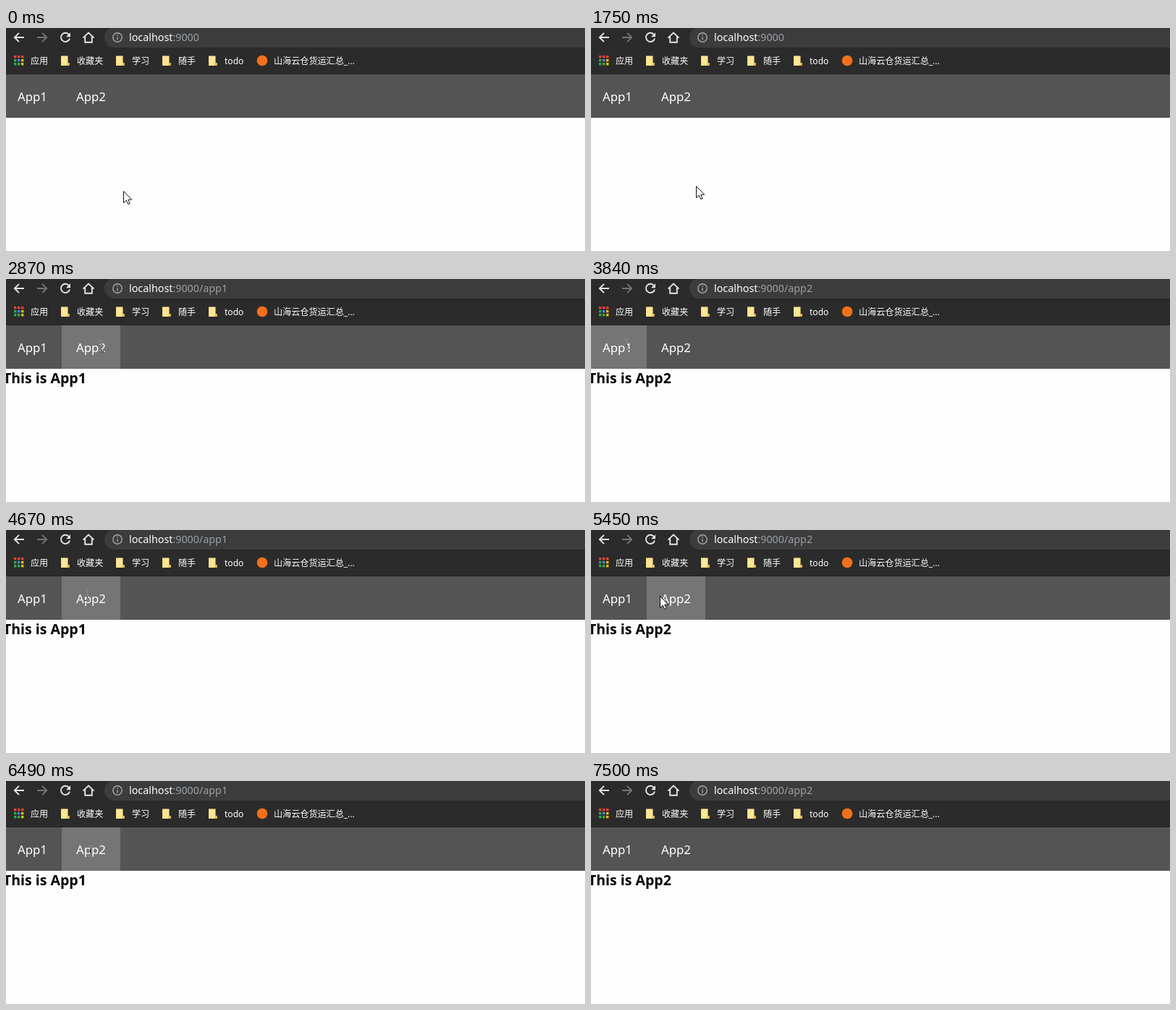
Write an HTML page that moves like this. It is 800 by 308 pixels and loops after 8.06 s.

```html
<!DOCTYPE html>
<html lang="zh">
<head>
<meta charset="utf-8">
<title>Micro frontend routing</title>
<style>
  html, body { margin: 0; width: 100%; height: 100%; overflow: hidden; background: #fefefe; }
  svg { display: block; width: 800px; height: 308px; }
  text { font-family: "Noto Sans", "Noto Sans CJK SC", "Noto Sans CJK", sans-serif; fill: #fff; white-space: pre; }
  .url { font-size: 14.3px; }
  .dim { fill: #9aa0a6; }
  .marks { font-size: 12.1px; }
  .nav { font-size: 16.8px; }
  #page { font-size: 19.5px; font-weight: 700; fill: #000; }
  .icon { fill: none; stroke: #e4e6e9; stroke-width: 1.9; }
  #beam { fill: none; stroke: #fff; mix-blend-mode: difference; }
</style>
</head>
<body>
<svg viewBox="0 0 800 308">
  <defs>
    <g id="folder">
      <path d="M0 .5h9.5v9.5h2v4H0z" fill="#ffe594"/>
      <path d="M9.5 10h2v4H8.5v-2.5z" fill="#e9bd50"/>
    </g>
  </defs>

  <rect width="800" height="308" fill="#fefefe"/>
  <rect width="800" height="64" fill="#2b2b2b"/>
  <rect x="136" y="-1" width="700" height="28" rx="14" fill="#3c3c3c"/>
  <rect y="63" width="800" height="1" fill="#222"/>

  <g class="icon">
    <path d="M25 13H12.5M18 6.8L11.8 13L18 19.2"/>
    <path d="M43 13h12.5M50 6.8L56.2 13L50 19.2" stroke="#747474"/>
    <path d="M87 9.2A6.1 6.1 0 1 0 88 14.4"/>
    <path d="M89 6.2v6h-6z" fill="#e4e6e9" stroke="none"/>
    <path d="M106.5 13.6L114 6.6L121.5 13.6M109.2 12v7.8h9.6V12"/>
    <g stroke="#a4a8ad" stroke-width="1.4">
      <circle cx="154" cy="13" r="6.2"/>
      <path d="M154 12.2v4.3M154 9.2v1.6"/>
    </g>
  </g>
  <text class="url" x="170" y="18">localhost<tspan class="dim">:9000<tspan id="route"></tspan></tspan></text>

  <g id="apps"></g>
  <use href="#folder" x="76" y="38"/>
  <use href="#folder" x="152" y="38"/>
  <use href="#folder" x="216" y="38"/>
  <use href="#folder" x="280" y="38"/>
  <circle cx="354" cy="45" r="7.3" fill="#f2701c"/>
  <g class="marks">
    <text x="34" y="50">应用</text>
    <text x="98" y="50">收藏夹</text>
    <text x="174" y="50">学习</text>
    <text x="238" y="50">随手</text>
    <text x="302" y="50">todo</text>
    <text x="370" y="50">山海云仓货运汇总_...</text>
  </g>

  <rect y="64" width="800" height="60" fill="#545454"/>
  <rect id="hover" y="64" height="60" fill="#757575"/>
  <text class="nav" x="16" y="101">App1</text>
  <text class="nav" x="97" y="101">App2</text>
  <text id="page" x="-4" y="144"></text>

  <path id="arrow" d="M.5.5V16.6L4.2 13.1L6.7 18.4L9.1 17.3L6.7 12.1H11.7Z" fill="#fff" stroke="#111"/>
  <path id="beam" d="M-3.5-7.5h3M.5-7.5h3M0-7V7M-3.5 7.5h3M.5 7.5h3"/>
</svg>
<script>
  const LOOP = 8060;
  const el = id => document.getElementById(id);

  // [time, x, y, shape]; the arrow is placed by its tip, the beam by its centre
  const pointer = [
    [0, 162, 225, 'arrow'], [560, 160, 225, 'arrow'], [680, 159, 224, 'arrow'],
    [1230, 163, 224, 'arrow'], [1350, 167, 224, 'arrow'], [1470, 169, 224, 'arrow'],
    [1750, 145, 218, 'arrow'], [1900, 84, 170, 'arrow'], [2030, 21, 124, 'arrow'],
    [2170, 33, 101, 'beam'], [2290, 36, 97, 'beam'], [2710, 42, 97, 'beam'],
    [2870, 131.5, 93, 'beam'], [3010, 132.5, 92, 'beam'], [3680, 99.5, 92, 'beam'],
    [3840, 49.5, 90, 'beam'], [3990, 41.5, 88, 'beam'],
    [4670, 112.5, 90, 'beam'], [4790, 107.5, 89, 'beam'], [4940, 91, 88, 'arrow'],
    [5450, 95, 91, 'arrow'], [5570, 60, 90, 'arrow'], [5690, 49.5, 92, 'beam'],
    [6340, 54.5, 92, 'beam'], [6490, 116.5, 97, 'beam'],
    [7050, 402, 176, 'arrow'], [7200, 648, 263, 'arrow'], [7350, 712, 290, 'arrow'],
    [7500, 0, 0, 'none']
  ];
  // [time, app number]; 0 means none
  const hovers = [[0, 0], [2170, 1], [2870, 2], [3840, 1], [4670, 2], [5570, 1], [6490, 2], [7050, 0]];
  const routes = [[0, 0], [2440, 1], [3440, 2], [4390, 1], [5210, 2], [6220, 1], [6900, 2]];
  const pages = [[0, 0], [2590, 1], [3560, 2], [4390, 1], [5330, 2], [6340, 1], [6900, 2]];

  const at = (track, t) => track.findLast(step => step[0] <= t);

  function setText(id, text) {
    if (el(id).textContent !== text) el(id).textContent = text;
  }

  function draw(now) {
    const t = now % LOOP;
    const [, x, y, shape] = at(pointer, t);
    for (const id of ['arrow', 'beam']) {
      el(id).setAttribute('visibility', id === shape ? 'visible' : 'hidden');
      el(id).setAttribute('transform', `translate(${x} ${y})`);
    }
    const hover = at(hovers, t)[1];
    el('hover').setAttribute('x', hover === 2 ? 77 : 0);
    el('hover').setAttribute('width', [0, 77, 81][hover]);

    const route = at(routes, t)[1], page = at(pages, t)[1];
    setText('route', route ? `/app${route}` : '');
    setText('page', page ? `This is App${page}` : '');
  }

  const [red, green, blue, yellow] = ['#ea4335', '#34a853', '#4285f4', '#fbbc05'];
  el('apps').innerHTML = [red, red, red, green, blue, yellow, green, green, yellow]
    .map((fill, i) => `<rect x="${11 + i % 3 * 5}" y="${38 + Math.floor(i / 3) * 5}" width="3.4" height="3.4" fill="${fill}"/>`)
    .join('');

  const start = performance.now();
  function tick() {
    draw(performance.now() - start);
    requestAnimationFrame(tick);
  }
  tick();
</script>
</body>
</html>
```
